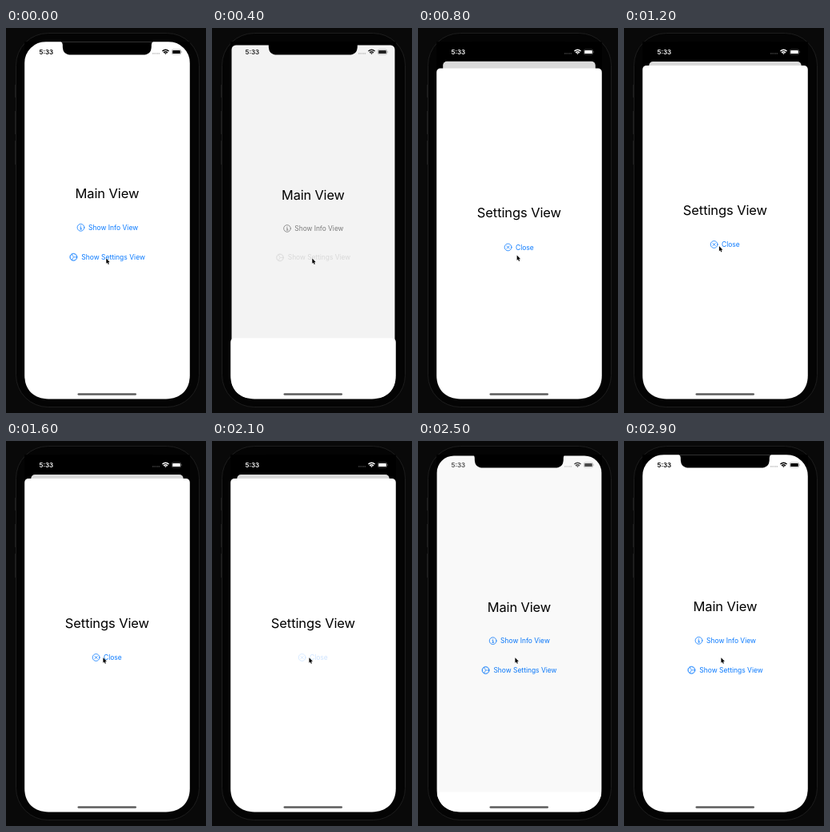
Write an HTML page that moves like this. It is 250 by 482 pixels and loops after 3000 ms.

```html
<!DOCTYPE html>
<html lang="en">
<head>
<meta charset="utf-8">
<title>Sheet presentation</title>
<style>
  html, body { margin: 0; width: 100%; height: 100%; overflow: hidden; background: #090909; }
  svg { display: block; width: 100vw; height: 100vh; }
  text { font-family: Inter, Roboto, sans-serif; }
  .title { font-size: 16.5px; letter-spacing: -.1px; text-anchor: middle; fill: #000; }
  .label { font-size: 8.5px; fill: currentColor; }
  .icon { fill: none; stroke: currentColor; stroke-width: .8; stroke-linecap: round; }
  .button { color: #0a7aff; }
</style>
</head>
<body>
<svg viewBox="0 0 250 482">
  <defs>
    <clipPath id="glass">
      <path d="M23.2 17.2H229.8V435C229.8 453 218 464.4 200 464.4H53C35 464.4 23.2 453 23.2 435Z"/>
    </clipPath>
  </defs>

  <!-- phone body -->
  <rect width="250" height="482" fill="#090909"/>
  <g fill="#1d1d1d">
    <rect x="11" y="71" width="2" height="16"/>
    <rect x="11" y="104" width="2" height="29"/>
    <rect x="11" y="141" width="2" height="30"/>
    <rect x="239.6" y="104" width="2" height="51" fill="#303030"/>
  </g>
  <rect x="12.5" y="6.5" width="229" height="468" rx="40" fill="#040404" stroke="#1d1d1d"/>

  <g clip-path="url(#glass)">
    <rect x="23" y="17" width="207" height="448" fill="#000"/>

    <g id="main">
      <rect id="card" x="23" y="17" width="207" height="448" fill="#fff"/>
      <text class="title" x="126.4" y="213">Main View</text>
      <g id="info" class="button">
        <g class="icon" transform="translate(93.5 249.8)">
          <circle r="4.4"/>
          <path d="M-.7-.6H.2V2M-.9 2H1.1M0-2.2V-2.1"/>
        </g>
        <text class="label" x="103" y="252.9">Show Info View</text>
      </g>
      <g id="settings" class="button">
        <g class="icon" transform="translate(84.4 286.8)">
          <circle r="4.2"/>
          <circle r="4.7" stroke-width=".4" stroke-dasharray=".6 .9"/>
          <path d="M.4 0H4M-.2-.4L-2-3.5M-.2.4L-2 3.5" stroke-width=".7"/>
        </g>
        <text class="label" x="94.3" y="289.9">Show Settings View</text>
      </g>
    </g>
    <rect id="dim" x="23" y="17" width="207" height="448"/>

    <g id="sheet">
      <path d="M23 450V5a5 5 0 0 1 5-5H225a5 5 0 0 1 5 5V450Z" fill="#fff"/>
      <text class="title" x="126.4" y="187">Settings View</text>
      <g id="close" class="button">
        <g class="icon" transform="translate(112.6 224)">
          <circle r="4.4"/>
          <path d="M-1.6-1.6L1.6 1.6M1.6-1.6L-1.6 1.6"/>
        </g>
        <text class="label" x="122" y="227.1">Close</text>
      </g>
    </g>

    <path d="M66.5 16.5Q70.8 17 70.8 21V23Q70.8 33.6 81.5 33.6H171Q181.8 33.6 181.8 23V21Q181.8 17 186 16.5Z" fill="#000"/>

    <g id="status">
      <text x="41.5" y="33" font-size="8" font-weight="600" fill="currentColor">5:33</text>
      <g fill="currentColor" opacity=".28">
        <rect x="183" y="31.3" width="1.6" height="1.3"/>
        <rect x="185.5" y="31.3" width="1.6" height="1.3"/>
        <rect x="188" y="31.3" width="1.6" height="1.3"/>
        <rect x="190.5" y="31.3" width="1.6" height="1.3"/>
      </g>
      <g fill="none" stroke="currentColor" stroke-width="1.3">
        <path d="M195.4 29.1Q199.5 25.3 203.6 29.1M197 30.9Q199.5 28.7 202 30.9"/>
        <path d="M198.4 31.6H200.6L199.5 32.7Z" stroke-width=".5" fill="currentColor"/>
      </g>
      <rect x="207.3" y="27" width="11.4" height="6" rx="1.7" fill="none" stroke="currentColor" stroke-width=".5" stroke-opacity=".5"/>
      <rect x="208.2" y="27.9" width="9.6" height="4.2" rx=".9" fill="currentColor"/>
      <path d="M219.4 29.1Q220.7 30 219.4 30.9Z" fill="currentColor" opacity=".6"/>
    </g>
    <rect x="89.5" y="457.2" width="73.5" height="2.6" rx="1.3" fill="#5c5c5c"/>
  </g>

  <path id="cursor" d="M0 0V6.4L1.4 5.1L2.4 7.5L3.5 7L2.5 4.7H4.5Z" fill="#000" stroke="#fff" stroke-width=".6" stroke-linejoin="round" paint-order="stroke"/>
</svg>

<script>
const LOOP = 3000, STEP = 100;
const PRESENT = 349, DISMISS = 2202;
const SHEET_TOP = 47, SCREEN_TOP = 17, SCREEN_END = 464.4;
const $ = id => document.getElementById(id);
const clamp = v => Math.max(0, Math.min(1, v));
const ease = v => { v = clamp(v); return v * v * (3 - 2 * v); };
const mix = (a, b, k) => a + (b - a) * k;

// Critically damped spring, 0 to 1
function spring(ms) {
  const x = Math.max(0, ms) * 0.0152;
  return 1 - (1 + x) * Math.exp(-x);
}

function pointer(t) {
  const a = ease((t - 600) / 600), b = ease((t - 1200) / 400);
  return [mix(mix(125.3, 118.9, a), 121.4, b), mix(mix(288.5, 273, a), 271.3, b)];
}

function draw(t) {
  const open = t < DISMISS ? spring(t - PRESENT) : 1 - spring(t - DISMISS);
  const fade = t < DISMISS ? clamp((t - PRESENT) / 420) : 1 - clamp((t - DISMISS) / 420);
  const scale = 1 - 0.08 * open;
  const place = `translate(${126.4 * (1 - scale)} ${SCREEN_TOP + 25 * open - SCREEN_TOP * scale}) scale(${scale})`;

  $('main').setAttribute('transform', place);
  $('card').setAttribute('rx', mix(27, 5.4, ease(open * 5.5)));
  $('dim').setAttribute('opacity', 0.145 * open ** 0.65);
  $('sheet').setAttribute('transform', `translate(0 ${mix(SCREEN_END, SHEET_TOP, open)})`);

  const tint = t > PRESENT && t < DISMISS ? '#808080' : '#0a7aff';
  $('info').style.color = $('settings').style.color = tint;
  $('settings').setAttribute('opacity', t >= 200 && t < 600 ? 0.22 : 1);
  $('close').setAttribute('opacity', t >= 2100 && t < 2300 ? 0.2 : 1);

  const g = Math.round(255 * fade);
  $('status').style.color = `rgb(${g},${g},${g})`;
  $('cursor').setAttribute('transform', `translate(${pointer(t)})`);
}

const start = performance.now();
function tick() {
  const t = (performance.now() - start) % LOOP;
  draw(Math.floor(t / STEP) * STEP);
  requestAnimationFrame(tick);
}
draw(0);
requestAnimationFrame(tick);
</script>
</body>
</html>
```
